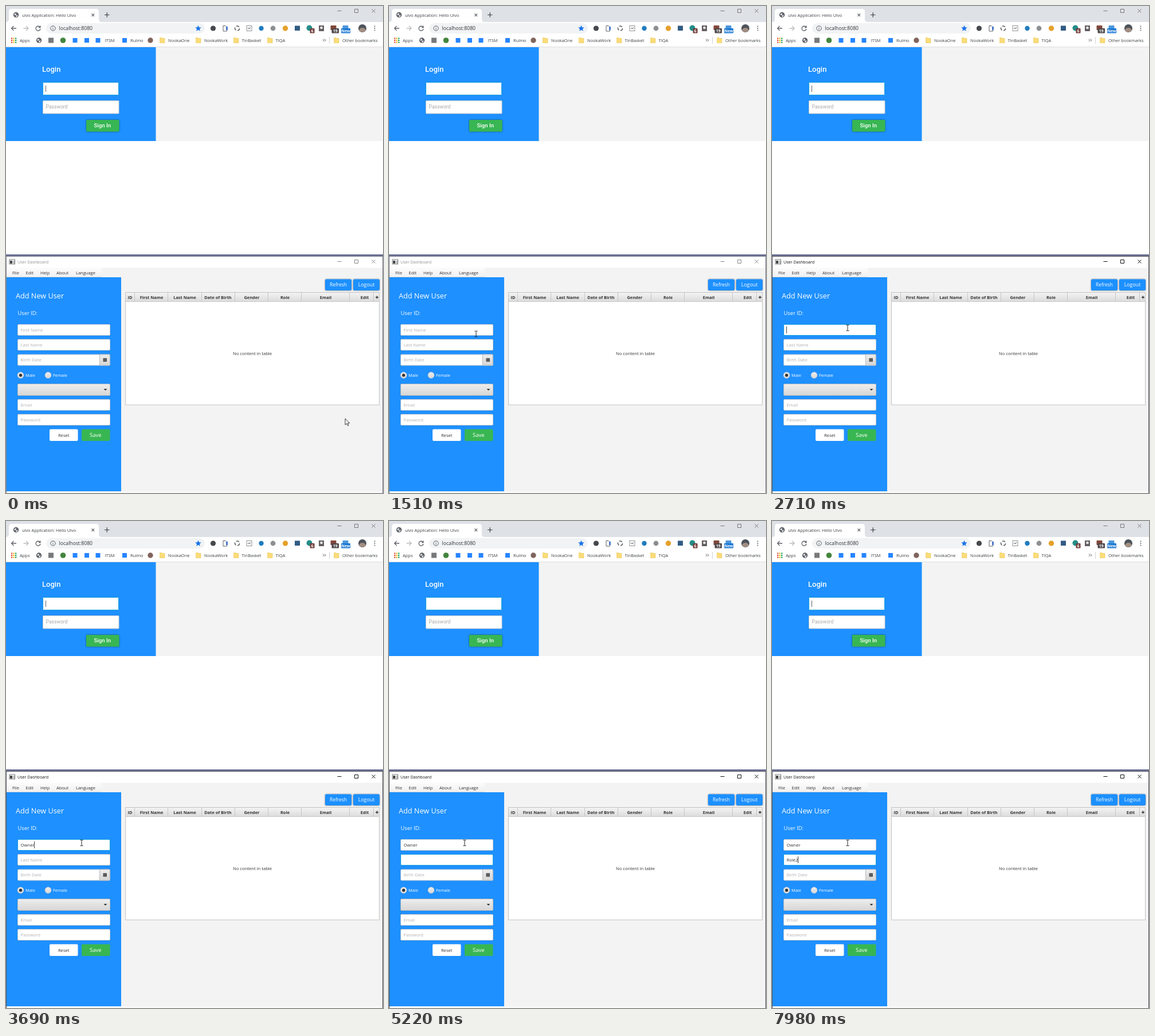
Animation of 658x851 px, one loop 8 s. Source, as an HTML page:

```html
<!DOCTYPE html>
<html lang="en">
<head>
<meta charset="utf-8">
<title>User form</title>
<style>
html, body { margin: 0; width: 100%; height: 100%; overflow: hidden; background: #fff; }
svg { display: block; width: 658px; height: 851px; }
text { font-family: "Open Sans", "Noto Sans", sans-serif; white-space: pre; }
.web { font-family: Roboto, Arial, sans-serif; }
</style>
</head>
<body>
<svg id="stage" viewBox="0 0 658 851" xmlns="http://www.w3.org/2000/svg">
  <defs>
    <linearGradient id="head" x2="0" y2="1"><stop stop-color="#f3f3f3"/><stop offset="1" stop-color="#dcdcdc"/></linearGradient>
    <linearGradient id="combo" x2="0" y2="1"><stop stop-color="#eee"/><stop offset="1" stop-color="#d6d6d6"/></linearGradient>
    <linearGradient id="menu" x2="0" y2="1"><stop stop-color="#fcfcfc"/><stop offset="1" stop-color="#f0f0f0"/></linearGradient>
    <filter id="glow" x="-20%" y="-30%" width="140%" height="170%"><feDropShadow dx="0" dy="0" stdDeviation="1.2" flood-color="#000" flood-opacity=".65"/></filter>
  </defs>
</svg>
<script>
const stage = document.getElementById('stage');
const BLUE = '#1e90ff', GREEN = '#38b652', INK = '#333', GREY = '#5f6368';
const BORDER = '#c4c8cc', FOCUS = '#18a0dc';

function add(tag, attrs, parent = stage) {
  const node = document.createElementNS('http://www.w3.org/2000/svg', tag);
  for (const key in attrs) node.setAttribute(key, attrs[key]);
  return parent.appendChild(node);
}
const rect = (x, y, width, height, fill, more) => add('rect', { x, y, width, height, fill, ...more });
const dot = (cx, cy, r, fill, more) => add('circle', { cx, cy, r, fill, ...more });
const line = (d, stroke, width = 1, more) => add('path', { d, stroke, 'stroke-width': width, fill: 'none', ...more });
const shape = (d, fill, more) => add('path', { d, fill, ...more });
function label(x, y, content, size, fill = INK, more = {}) {
  const node = add('text', { x, y, 'font-size': size, fill, ...more });
  node.textContent = content;
  return node;
}
const centred = (x, y, content, size, fill, more) =>
  label(x, y, content, size, fill, { 'text-anchor': 'middle', ...more });

function windowButtons(y, stroke) {
  return [
    line(`M578.5 ${y + .5}h7`, stroke),
    line(`M608.5 ${y - 2.5}h6v6h-6z`, stroke),
    line(`M638.5 ${y - 2.5}l6 6m0-6l-6 6`, stroke)
  ];
}
function globe(x, y) {
  dot(x, y, 4.7, GREY);
  shape(`M${x - 3.5} ${y - 1}l3-2 1 2-2 2zM${x} ${y + 1}l3-1-1 3-2 1z`, '#eef0f2');
}
const folder = x =>
  shape(`M${x - 4} 55.5h3.5l1 1h4v8h-8.5z`, '#fbdc79', { stroke: '#e9c45a', 'stroke-width': .6 });

// Browser frame
rect(0, 0, 658, 28, '#dee1e6');
shape('M0 28Q5 28 5 23V10Q5 5 10 5H157Q162 5 162 10V23Q162 28 167 28Z', '#fff');
globe(17.5, 15.5);
label(28, 18.6, 'ulvo Application: Hello Ulvo', 7.4, '#3c4043');
line('M149.5 13.5l4.5 4.5m0-4.5l-4.5 4.5', GREY, 1.1);
line('M172 15.5h8.5M176.25 11.2v8.6', '#3c4043', 1.2);
windowButtons(8, '#777');
rect(0, 28, 658, 44, '#fff');
line('M18 39H9.5M13.5 35l-4 4 4 4', GREY, 1.3);
line('M30.5 39H39M35 35l4 4-4 4', '#babcbe', 1.3);
line('M59 36.5A4 4 0 1 0 60 40M60 34.5v3h-3', GREY, 1.3);
rect(70, 30, 277, 18, '#f1f3f4', { rx: 9 });
dot(82, 39, 4.2, 'none', { stroke: GREY });
line('M82 38.5v3M82 36.2v1', GREY);
label(92.5, 42.1, 'localhost:8080', 8.7, '#303236');
shape('M335.5 33.8l1.5 3.4 3.8.4-2.9 2.5.9 3.7-3.3-2-3.3 2 .9-3.7-2.9-2.5 3.8-.4z', '#1a73e8');

// Browser extensions
dot(361.5, 39, 4.6, '#45484d');
line('M379 34.5h4l2.5 2.5v7H379z', GREY, 1);
rect(384, 36, 3, 6, '#4d78c9');
dot(403.5, 39, 4, 'none', { stroke: '#55585c', 'stroke-width': 1.5, 'stroke-dasharray': '5.5 2.8' });
rect(420, 34.5, 9, 9, '#fff', { stroke: '#909397' });
line('M422 40l1.5-2 1.5 2 2-3', GREY);
dot(445.5, 39, 4.2, '#217bbd');
dot(466, 39, 4.4, '#8c8f92');
dot(487.5, 39, 4.7, '#e5a12d');
rect(504, 34.5, 9, 8.5, '#315b84');
dot(529.5, 38.5, 5, '#248d88');
rect(530.5, 39, 8, 8.5, '#743d3b', { rx: 1 });
centred(534.5, 46, '6', 7, '#fff', { 'font-weight': 700 });
rect(546, 34, 9, 10, '#655e62');
dot(550.5, 38, 2.3, '#eee');
rect(566.5, 34, 10, 8, '#82473a', { rx: 1 });
rect(568.5, 39, 12.5, 8.5, '#4c4648', { rx: 1 });
centred(574.8, 46, '19', 7, '#fff', { 'font-weight': 700 });
rect(587.5, 34, 10, 7, '#4d97dc', { rx: 1 });
rect(585, 39, 16, 8.5, '#1976d2', { rx: 1 });
centred(593, 45.9, 'New', 6.7, '#fff', { 'font-weight': 700 });
dot(622, 39, 7, '#4c535b');
shape('M616 42a6.6 6.6 0 0 0 12 0q-2-4-6-4t-6 4z', '#a38e83');
for (const y of [35.5, 39, 42.5]) dot(643.5, y, 1, GREY);

// Bookmarks
const appColours = ['#db4437', '#f4b400', '#0f9d58', '#4285f4'];
for (let i = 0; i < 9; i++)
  rect(9 + i % 3 * 3.5, 55.5 + (i / 3 | 0) * 3.5, 2.2, 2.2, appColours[(i + (i / 3 | 0)) % 4]);
globe(57.5, 60);
rect(74, 55.5, 9, 9, '#77797b');
dot(99.5, 60, 4.8, '#43853d');
for (const x of [120.5, 141, 160.5, 207]) rect(x - 4, 56, 8, 8, '#2684ff');
dot(252, 60, 4.7, '#80645c');
[[24, 'Apps'], [172.5, 'ITSM'], [217, 'Rulmo'], [283, 'NookaOne'], [346, 'NookaWork'],
 [411.5, 'TinBasket'], [470.5, 'TIQA'], [587, 'Other bookmarks']]
  .forEach(([x, name]) => label(x, 62.7, name, 7.5, '#3c4043'));
[272.5, 335.5, 401.5, 460.5, 576.5].forEach(folder);
line('M553 57.5l2 2.2-2 2.2M556 57.5l2 2.2-2 2.2', GREY, 1);
line('M564.5 54v12', '#d0d2d5');
line('M0 71.5h658', '#dddfe1');

// Login page
rect(0, 72, 658, 362, '#fff');
rect(261, 72, 396, 164, '#f3f3f3');
rect(0, 72, 261.5, 164, BLUE);
label(63, 115, 'Login', 13, '#fff', { class: 'web', 'font-weight': 500 });
rect(64.5, 133.5, 132, 22, '#fff', { rx: 1, stroke: FOCUS });
rect(64.5, 165.5, 132.5, 22.5, '#fff', { rx: 1, stroke: BORDER });
label(69.5, 179.3, 'Password', 8.6, '#a8a8a8', { class: 'web' });
rect(140, 199, 57.5, 20.5, GREEN, { rx: 2, filter: 'url(#glow)' });
centred(168.3, 212.3, 'Sign In', 9.6, '#fff', { class: 'web', 'font-weight': 500 });
const webCaret = rect(69, 139, 1, 11, '#666');

// Dashboard window
rect(0, 434, 658, 417, '#f3f3f3');
rect(0, 434, 658, 3, '#6c7191');
rect(0, 437, 658, 20.5, '#fff');
rect(6, 443, 9.5, 8, '#fff', { stroke: '#777' });
rect(7, 445, 4, 5, '#444');
rect(12, 445, 3, 5, '#b9bcc0');
const title = label(20, 450, 'User Dashboard', 7.15);
const dashButtons = windowButtons(446, '#888');
rect(1, 457.5, 166, 16, 'url(#menu)');
line('M1 473.5h166', '#dcdcdc');
[[11, 'File'], [34.5, 'Edit'], [60, 'Help'], [88, 'About'], [122, 'Language']]
  .forEach(([x, name]) => label(x, 468.5, name, 7.5));
rect(1, 474, 200, 374, BLUE);
rect(0, 848, 658, 3, '#fafafa');
const edges = [rect(0, 437, 1, 414), rect(657, 437, 1, 414), rect(0, 437, 658, 1)];

for (const [x, name, size] of [[557, 'Refresh', 8.4], [606, 'Logout', 8.8]]) {
  rect(x, 477.5, 46, 19.5, BLUE, { rx: 2, filter: 'url(#glow)' });
  centred(x + 23, 490.3, name, size, '#fff');
}

// Table
rect(208.5, 500.5, 443, 196.5, '#fff', { stroke: '#c2c2c2' });
rect(209, 501, 442, 15, 'url(#head)');
line('M208 516.5h444', '#c8c8c8');
for (const x of [224, 282, 341, 399, 457, 515, 599, 641]) line(`M${x + .5} 501v15`, '#c6c6c6');
[[216.5, 'ID'], [254, 'First Name'], [312, 'Last Name'], [370, 'Date of Birth'],
 [429, 'Gender'], [487, 'Role'], [558, 'Email'], [626, 'Edit']]
  .forEach(([x, name]) => centred(x, 512.4, name, 7.4, INK, { 'font-weight': 700 }));
line('M645 509h5M647.5 506.5v5', INK, 1.3);
centred(430, 610.3, 'No content in table', 7.65);

// Form
label(17, 511.3, 'Add New User', 12.7, '#fff');
label(20.5, 540, 'User ID:', 9.3, '#fff');

function inputBox(y, prompt) {
  const box = rect(20.5, y + .5, 161, 19, '#fff', { rx: 1.5, stroke: BORDER });
  const text = label(25.5, y + 12.9, prompt, 7.7, '#b2b2b2');
  return { y, prompt, box, text };
}
const inputs = [inputBox(556, 'First Name'), inputBox(582, 'Last Name')];
inputBox(608.5, 'Birth Date');
inputBox(687, 'Email');
inputBox(713, 'Password');
rect(163.5, 609, 17.5, 19, 'url(#combo)', { rx: 1, stroke: '#bbb' });
rect(169.5, 615.5, 6.5, 6, '#444');
line('M170 617.5h5.5M170 619.5h5.5', '#999', .6);
for (const [x, name] of [[25.5, 'Male'], [73.5, 'Female']]) {
  dot(x, 645.2, 5.5, 'url(#combo)', { stroke: '#b5c1cc', 'stroke-width': .7 });
  label(x + 8.5, 647.7, name, 7.4, '#fff');
}
dot(25.5, 645.2, 2.6, INK);
rect(20.5, 660.5, 161, 20, 'url(#combo)', { rx: 1.5, stroke: '#bbb' });
shape('M170.5 669h6l-3 3z', INK);
rect(76, 739.5, 49.5, 20.5, '#fff', { rx: 2 });
centred(100.7, 752.6, 'Reset', 7.6);
rect(132, 739.5, 49.5, 20.5, GREEN, { rx: 2 });
centred(156.3, 753.4, 'Save', 9.5, '#fff');
const formCaret = rect(25, 560, 1, 12, '#444');

// Pointers
const arrow = shape('M0 0V10.8L2.5 8.5 4.3 12.4 6 11.6 4.3 7.9H7.6Z', '#fff', { stroke: '#222', 'stroke-width': .9 });
const beam = line('M-2.5-5h2l.5.5.5-.5h2M0-4.5v9M-2.5 5h2l.5-.5.5.5h2', '#222', 1);

// Times in ms; each state holds until the next one.
const blinks = [190, 750, 1180, 1730, 2180, 2710, 3160, 3690, 4130, 4670, 5220, 5670, 6200, 6630, 7190, 7620];
const moves = [
  [0, 592, 721], [640, 530, 712], [750, 430, 697], [860, 340, 682], [960, 272, 670],
  [1070, 225, 648], [1180, 195, 621], [1300, 171, 598], [1410, 159, 580], [1510, 152, 573],
  [1620, 146, 568], [1730, 141, 566], [1840, 136, 564], [1950, 133, 563], [2290, 132, 562.5]
];
// [time, focused input, typed letters, caret shown]
const typing = [
  [0, -1, 0, 0], [2290, 0, 0, 1], [2820, 0, 1, 1], [2930, 0, 2, 1], [3160, 0, 3, 1], [3260, 0, 5, 1],
  [3800, 0, 5, 0], [4350, 0, 5, 1], [4790, 1, 0, 1], [5220, 1, 0, 0], [5770, 1, 0, 1],
  [6320, 1, 1, 1], [6750, 1, 1, 0], [6970, 1, 2, 1], [7080, 1, 3, 1], [7190, 1, 4, 1],
  [7520, 1, 4, 0], [7980, 1, 5, 1]
];
const words = ['Owner', 'Role2'];
const at = (table, t) => table.findLast(row => row[0] <= t);
const show = (node, on) => node.setAttribute('visibility', on ? 'visible' : 'hidden');

function drawForm(t) {
  const [, focus, count, caretOn] = at(typing, t);
  inputs.forEach((input, i) => {
    const focused = i === focus;
    const value = i < focus ? words[i] : focused ? words[i].slice(0, count) : '';
    input.text.textContent = value || (focused ? '' : input.prompt);
    input.text.setAttribute('fill', value ? INK : '#b2b2b2');
    input.box.setAttribute('stroke', focused ? FOCUS : BORDER);
    if (focused) {
      formCaret.setAttribute('x', 25 + Math.round(value ? input.text.getComputedTextLength() : 0));
      formCaret.setAttribute('y', input.y + 4);
    }
  });
  show(formCaret, caretOn);
}

function drawPointer(t) {
  const [, x, y] = at(moves, t);
  const overInput = x < 182 && inputs.some(input => y >= input.y && y <= input.y + 20);
  for (const node of [arrow, beam]) node.setAttribute('transform', `translate(${x} ${y})`);
  show(arrow, !overInput);
  show(beam, overInput);
}

function frame() {
  const t = performance.now() % 8000;
  const active = t >= 2290;
  show(webCaret, blinks.filter(time => time <= t).length % 2 === 0);
  title.setAttribute('fill', active ? '#111' : '#909090');
  dashButtons.forEach(node => node.setAttribute('stroke', active ? '#111' : '#888'));
  edges.forEach(node => node.setAttribute('fill', active ? '#50535f' : '#7c8194'));
  drawForm(t);
  drawPointer(t);
  requestAnimationFrame(frame);
}
frame();
</script>
</body>
</html>
```
